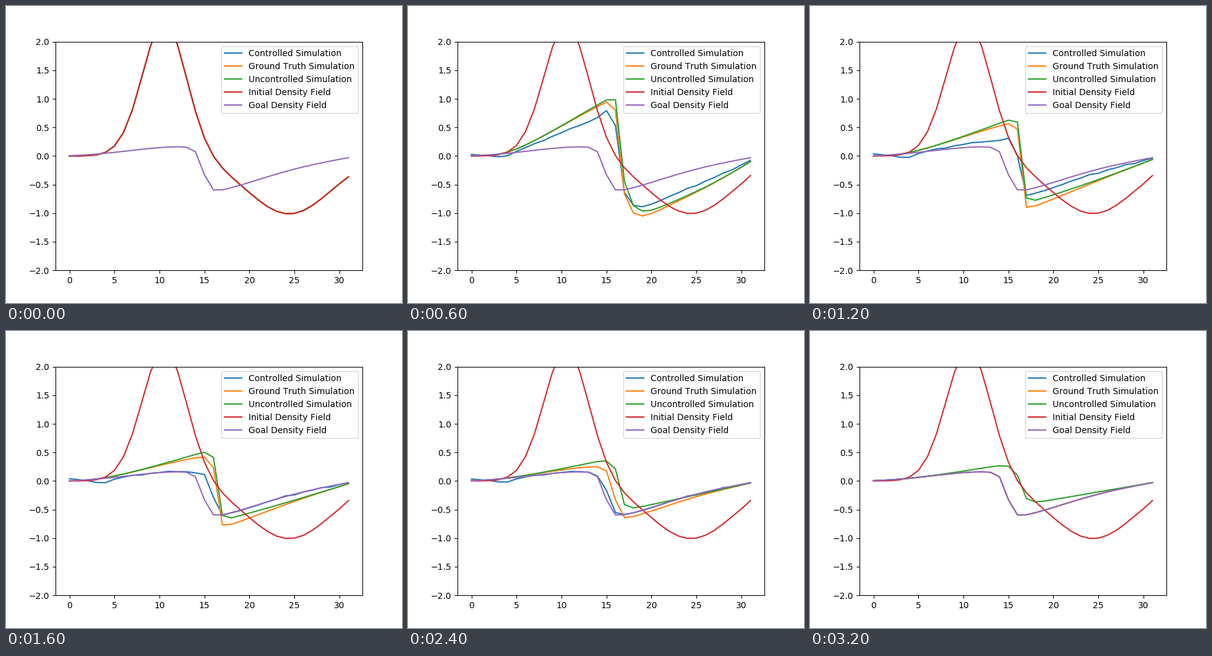
Write a matplotlib script that moves like this. It is 640 px wide and 480 px high and loops after 3.3 s.

```python
import numpy as np
import matplotlib.pyplot as plt
from matplotlib.animation import FuncAnimation

N, STEPS, DT, VISCOSITY = 32, 32, 0.03, 0.003
x = np.arange(N)


def bell(amp, center, sigma):
    return amp * np.exp(-0.5 * ((x - center) / sigma) ** 2)


def diffuse(u):
    p = np.pad(u, 1)
    return u + VISCOSITY * DT * N**2 * (p[:-2] - 2 * u + p[2:])


def advect(u):
    # semi-Lagrangian step, zero outside the domain
    return np.interp(x - u * DT * N, np.arange(-1, N + 1), np.pad(u, 1))


def simulate(u, force=0.0):
    states = [u]
    for _ in range(STEPS):
        u = advect(diffuse(u)) + force * DT
        states.append(u)
    return np.array(states)


def steer(states, goal):
    """Pull the states to the goal, slower at the shock, with small ripples."""
    t = np.arange(STEPS + 1)[:, None] / STEPS
    quick = np.minimum(1, 2 * t) ** 1.2
    slow = t ** 1.25
    weight = quick + (slow - quick) * bell(1, 15.2, 0.9)
    noise = np.random.default_rng(4).normal(0, 0.008, N)
    ripple = bell(0.04, 0, 0.9) - bell(0.07, 3.5, 1.2) + noise
    swell = np.sqrt(np.clip(np.sin(np.pi * t), 0, 1))
    return states + weight * (goal - states) + swell * ripple


start = bell(2.36, 10.55, 2.43) + bell(-1.012, 24.4, 4.62)
free = simulate(start)
truth = simulate(start, bell(-0.6, 18.1, 4.1))
goal = truth[-1]

series = {
    "Controlled Simulation": steer(truth, goal),
    "Ground Truth Simulation": truth,
    "Uncontrolled Simulation": free,
    "Initial Density Field": np.array([start] + [diffuse(start)] * STEPS),
    "Goal Density Field": np.tile(goal, (STEPS + 1, 1)),
}

plt.rcParams["text.kerning_factor"] = 6
fig, ax = plt.subplots(figsize=(6.4, 4.8), dpi=100)
lines = [ax.plot(x, data[0], label=name)[0] for name, data in series.items()]
ax.set_xlim(-1.55, 32.55)
ax.set_ylim(-2, 2)
ax.legend(loc="upper right")


def update(step):
    for line, data in zip(lines, series.values()):
        line.set_ydata(data[step])
    return lines


anim = FuncAnimation(fig, update, frames=STEPS + 1, interval=100, repeat=True)
plt.show()
```
